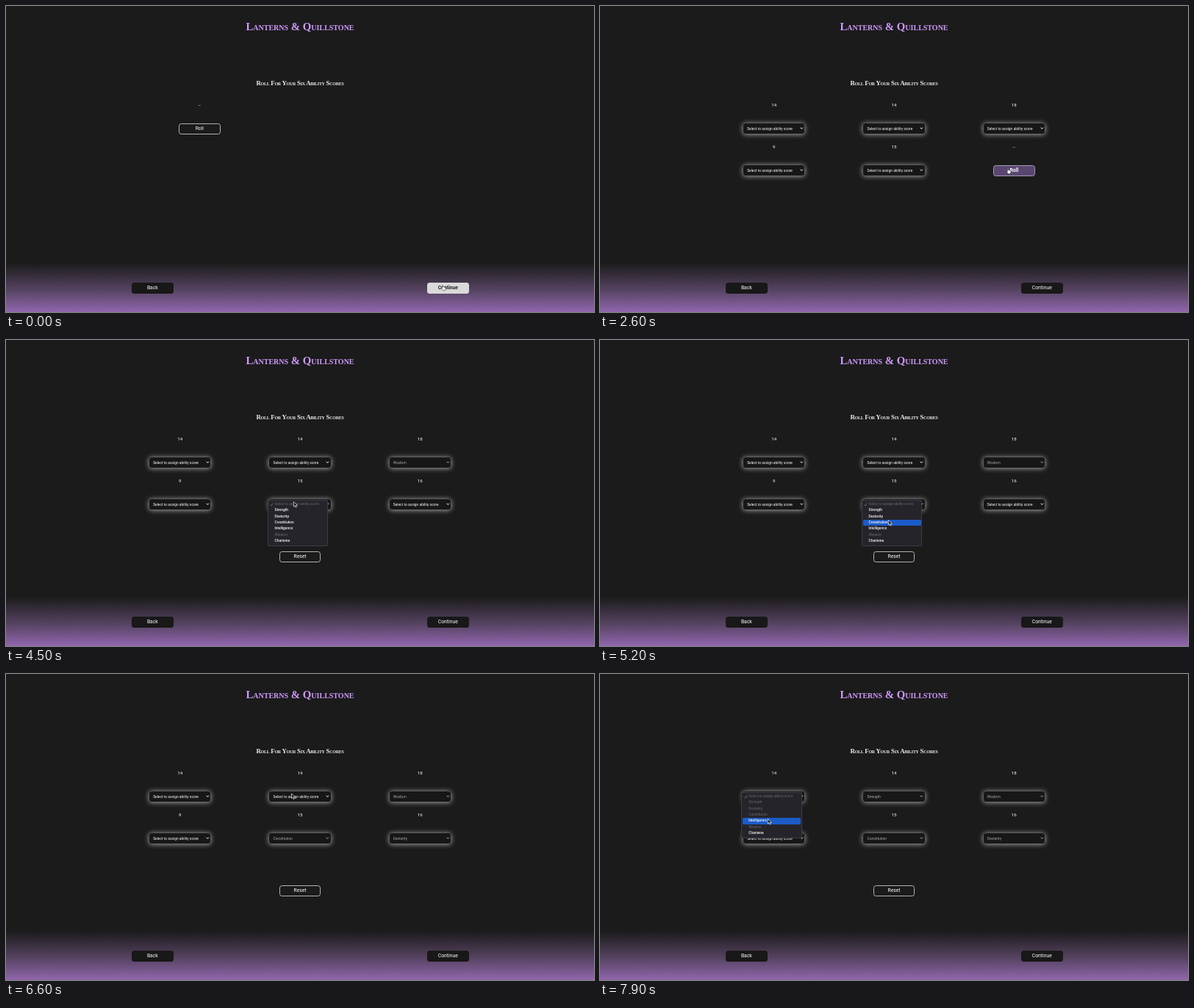
Animation of 800 by 417 pixels, one loop 8000 ms. Source, as an HTML page:

```html
<!DOCTYPE html>
<html lang="en">
<head>
<meta charset="utf-8">
<title>Ability scores</title>
<style>
  html, body { margin: 0; width: 100%; height: 100%; overflow: hidden; background: #1b1b1b; }
  #stage {
    position: relative; width: 800px; height: 417px; overflow: hidden;
    background: linear-gradient(#1b1b1b 350px, #54425f 386px, #9166ae 417px);
    color: #fff; font-family: Roboto, sans-serif; cursor: default;
  }
  #stage * { box-sizing: border-box; }
  #stage div, #cursor { position: absolute; white-space: nowrap; }
  h1, h2 {
    position: absolute; left: 0; width: 800px; margin: 0; text-align: center;
    font-family: "Liberation Serif", serif; font-weight: bold; font-variant: small-caps;
  }
  h1 { top: 17.5px; font-size: 14.8px; line-height: 20px; color: #d09aff; }
  h2 { top: 95px; font-size: 8.85px; line-height: 20px; letter-spacing: -.28px; color: #eee; }
  .button {
    width: 56.6px; height: 15px; border-radius: 3.5px; background: #181818;
    font-size: 6.75px; line-height: 15px; text-align: center;
  }
  .outlined { border: 1px solid #b2b2b2; background: #1b1b1b; line-height: 13px; }
  .button.hover { font-weight: bold; }
  .outlined.hover { background: #594770; border-color: #a69ab4; }
  #continue.hover { background: #dadada; color: #222; }
  .score { width: 40px; font-size: 6.2px; line-height: 10px; text-align: center; }
  .select {
    width: 83.5px; height: 14px; padding-left: 5.3px; border-radius: 3.5px;
    background: #171717; box-shadow: 0 .5px 6px 1px rgba(255, 255, 255, .55);
    font-size: 4.88px; line-height: 14px;
  }
  .select.assigned { color: #a9a9a9; }
  .select svg { position: absolute; right: 1.5px; top: 5.3px; fill: none; stroke: currentColor; }
  #menu {
    width: 82.5px; height: 62.5px; border-radius: 3px;
    background: #26242b; box-shadow: inset 0 0 0 .5px #56535c;
    font: 600 4.45px/8.35px Inter, sans-serif;
  }
  #menu div { left: 2px; width: 79px; height: 8.35px; padding-left: 8px; border-radius: 1.5px; }
  #menu .off { color: #65626b; font-weight: 500; }
  #menu .lit { background: #1b5cc8; }
  #menu svg { position: absolute; left: 3.5px; top: 4px; fill: none; stroke: #85828a; }
  #cursor { left: 0; top: 0; overflow: visible; }
</style>
</head>
<body>
<div id="stage">
  <h1>Lanterns &amp; Quillstone</h1>
  <h2>Roll For Your Six Ability Scores</h2>
  <div class="button" style="left:171px;top:377px">Back</div>
  <div class="button" id="continue" style="left:573px;top:377px">Continue</div>
  <div class="button outlined" id="reset" style="left:371.7px;top:287.5px">Reset</div>
  <div id="menu"><svg width="5" height="5"><path d="M.8 2.4 2 4 4.2.5" stroke-width=".7"/></svg></div>
  <svg id="cursor" width="8" height="10" stroke-linejoin="round">
    <path id="arrow" d="M.4.4V7L2 5.6 3.1 8.1 4.3 7.6 3.2 5.2H5.4Z" fill="#111" stroke="#fff" stroke-width=".65"/>
    <path id="hand" d="M1.4 1Q2.1.1 2.7 1V3Q3.4 2.5 3.9 3.1 4.6 2.7 5 3.4 5.9 3.1 6 4V5.5L5.2 7.7H2.5L.5 5Q.2 4 1.4 4.5Z" fill="#fff" stroke="#222" stroke-width=".55"/>
  </svg>
</div>
<script>
const LOOP = 8000, STEP = 100;
const PROMPT = 'Select to assign ability score';
const ABILITIES = ['Strength', 'Dexterity', 'Constitution', 'Intelligence', 'Wisdom', 'Charisma'];
const SCORES = [14, 14, 18, 9, 15, 16];
const ROLL_TIMES = [700, 1000, 1400, 1900, 2300, 2900];
const ROW_HEIGHT = 8.35, MENU_PAD = 1.7;
const PICKS = [
  { slot: 2, open: 3200, close: 4000, ability: 'Wisdom' },
  { slot: 4, open: 4500, close: 5300, ability: 'Constitution' },
  { slot: 5, open: 5600, close: 6100, ability: 'Dexterity' },
  { slot: 1, open: 6700, close: 7100, ability: 'Strength' },
  { slot: 0, open: 7700, close: 8000, ability: 'Intelligence' }
];
// Pointer stops: time, x, y
const STOPS = [
  [100, 592, 380], [600, 262, 167], [700, 262, 167], [950, 430, 168], [1000, 432, 168],
  [1300, 544, 169], [1400, 546, 169], [1800, 246, 222], [1900, 246, 222],
  [2200, 388, 222], [2300, 389, 222], [2600, 553, 221], [2800, 555, 221],
  [3100, 548, 165], [3300, 548, 165], [3700, 548, 206], [4000, 547, 205],
  [4400, 391, 220], [4600, 391, 220], [5200, 392, 245], [5300, 393, 245],
  [5500, 537, 221], [5700, 537, 221], [6000, 540, 239], [6100, 540, 239],
  [6600, 388, 162.5], [6800, 388, 162.5], [7000, 388, 174], [7100, 386, 174],
  [7600, 228, 168], [7700, 228, 169], [7900, 228, 197]
];

const $ = id => document.getElementById(id);
const stage = $('stage'), menu = $('menu'), cursor = $('cursor');

function add(parent, className, text = '') {
  const el = document.createElement('div');
  el.className = className;
  el.textContent = text;
  parent === stage ? stage.insertBefore(el, menu) : parent.append(el);
  return el;
}
function place(el, x, y) {
  el.style.left = x + 'px';
  el.style.top = y + 'px';
}
function show(el, on) { el.style.display = on ? '' : 'none'; }

const slots = SCORES.map(() => {
  const score = add(stage, 'score'), roll = add(stage, 'button outlined', 'Roll');
  const select = add(stage, 'select');
  select.innerHTML = '<span></span><svg width="5" height="4"><path d="M.7.7 2.4 2.4 4.1.7" stroke-width="1"/></svg>';
  return { score, roll, select, label: select.firstChild };
});
const options = [PROMPT, ...ABILITIES].map((name, i) => {
  const el = add(menu, '', name);
  el.style.top = MENU_PAD + i * ROW_HEIGHT + 'px';
  return el;
});
menu.append(menu.querySelector('svg'));

function pointerAt(t) {
  const next = STOPS.findIndex(stop => stop[0] > t);
  if (next === 0) return STOPS[0].slice(1);
  if (next < 0) return STOPS[STOPS.length - 1].slice(1);
  const [t0, x0, y0] = STOPS[next - 1], [t1, x1, y1] = STOPS[next];
  const u = (t - t0) / (t1 - t0), k = u * u * (3 - 2 * u);
  return [x0 + (x1 - x0) * k, y0 + (y1 - y0) * k];
}

// Empty columns share the free width, so the first cells shift as the row fills.
function slotCenter(i, rolled) {
  const used = Math.min(rolled + 1, 3);
  const width = 80 + (490 - 80 * used) / 3;
  return 155 + width * (i % 3 + .5);
}

function render(t) {
  const [px, py] = pointerAt(t);
  const over = (x, y) => px + 2 > x && px + 2 < x + 57 && py + 1 > y && py + 1 < y + 15;
  const rolled = ROLL_TIMES.filter(time => time <= t).length;
  const done = PICKS.filter(pick => pick.close <= t);
  const current = PICKS.find(pick => pick.open <= t && t < pick.close);

  let onButton = over(573, 377);
  $('continue').classList.toggle('hover', onButton);

  slots.forEach(({ score, roll, select, label }, i) => {
    const x = slotCenter(i, rolled), y = i < 3 ? 160 : 217;
    const pick = done.find(p => p.slot === i), hover = i === rolled && over(x - 28.5, y);
    onButton = onButton || hover;
    show(score, i <= rolled);
    show(roll, i === rolled);
    show(select, i < rolled);
    place(score, x - 20, y - 30);
    place(roll, x - 28.3, y + .2);
    place(select, x - 41.8, y);
    score.textContent = i < rolled ? SCORES[i] : '--';
    label.textContent = pick ? pick.ability : PROMPT;
    select.classList.toggle('assigned', !!pick);
    roll.classList.toggle('hover', hover);
  });

  show($('reset'), done.length);
  show(menu, current);
  if (current) {
    const top = current.slot < 3 ? 161.3 : 218.3;
    place(menu, slotCenter(current.slot, 6) - 44.5, top);
    const row = Math.floor((py + 1 - top - MENU_PAD) / ROW_HEIGHT);
    options.forEach((el, i) => {
      const off = i === 0 || done.some(p => p.ability === el.textContent);
      el.className = off ? 'off' : i === row ? 'lit' : '';
    });
  }

  show($('hand'), onButton);
  show($('arrow'), !onButton);
  cursor.style.transform = `translate(${px}px, ${py}px)`;
}

const start = performance.now();
function tick() {
  const t = (performance.now() - start) % LOOP;
  render(Math.floor(t / STEP) * STEP);
  requestAnimationFrame(tick);
}
tick();
</script>
</body>
</html>
```
